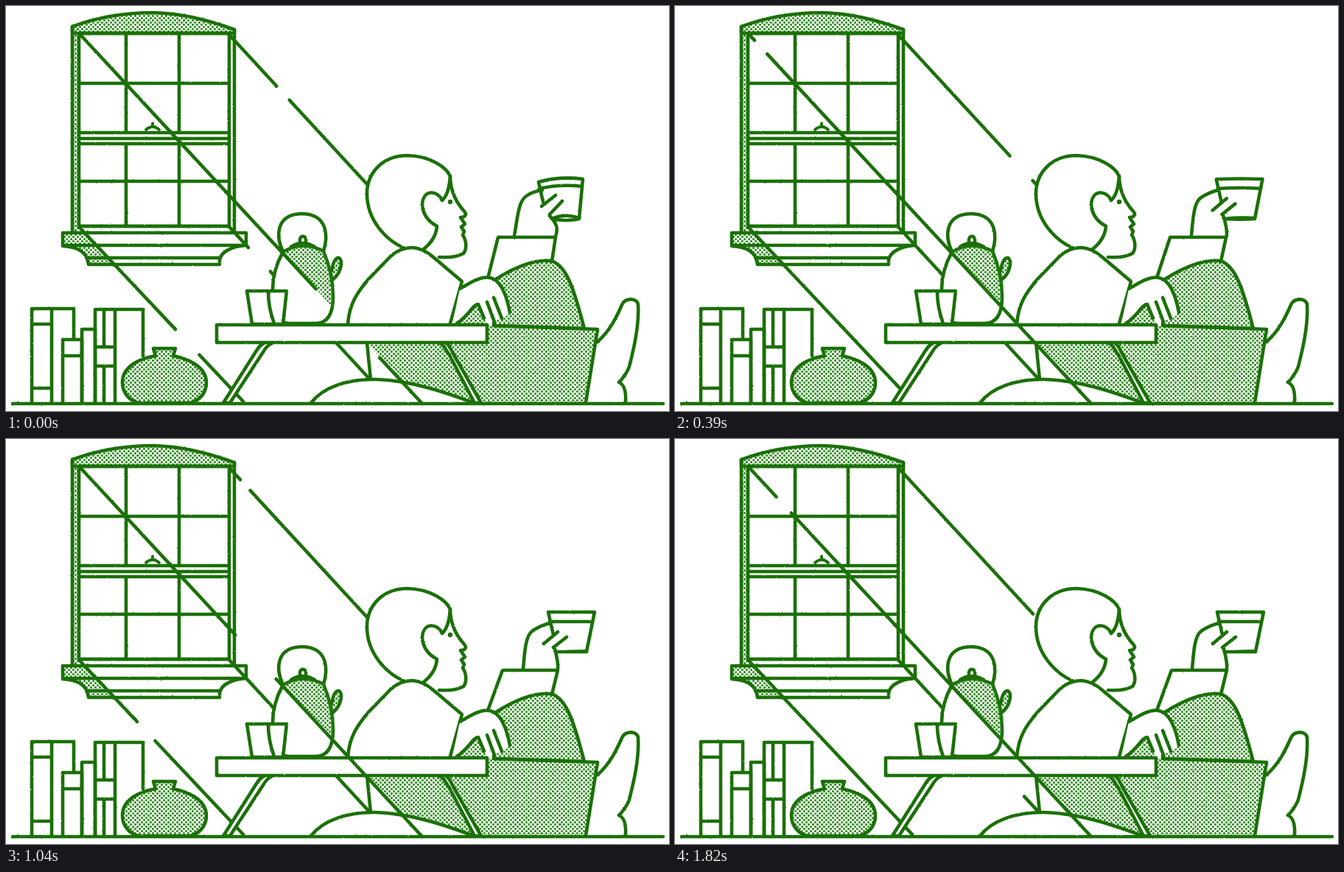
An HTML page for the animation above (1.95 s loop, 900 by 550 pixels).

```html
<!DOCTYPE html>
<html lang="en">
<head>
<meta charset="utf-8">
<title>Sunbeams</title>
<style>
  html, body { margin: 0; width: 100%; height: 100%; overflow: hidden; background: #fff; }
  svg { display: block; width: 100%; height: 100%; }
  #art { fill: none; stroke: #1b7008; stroke-width: 4.6; stroke-linecap: round; stroke-linejoin: round; }
  .paper { fill: #fff; }
  .dots { fill: url(#dots); }
  .bare { stroke: none; }
</style>
</head>
<body>
<svg viewBox="0 0 900 550" xmlns="http://www.w3.org/2000/svg">
  <defs>
    <pattern id="dots" width="6" height="6" patternUnits="userSpaceOnUse">
      <g fill="#2b8c1a"><circle cx="1.5" cy="1.5" r="1.55"/><circle cx="4.5" cy="4.5" r="1.55"/></g>
    </pattern>
    <filter id="rough" filterUnits="userSpaceOnUse" x="0" y="0" width="900" height="550" color-interpolation-filters="sRGB">
      <feTurbulence type="fractalNoise" baseFrequency=".4" numOctaves="2" seed="4"/>
      <feDisplacementMap in="SourceGraphic" scale="1.8" xChannelSelector="R" yChannelSelector="G"/>
    </filter>
    <path id="body" d="M376 334Q402 318 431 333C438 350 444 372 444 395C444 416 438 431 420 431H384C366 431 361 412 362 385C362 368 367 350 376 334Z"/>
    <clipPath id="pot"><use href="#body"/></clipPath>
  </defs>

  <g id="art" filter="url(#rough)">
    <!-- window -->
    <path class="dots" d="M90 28C130 13 165 9 200 9C240 10 278 20 310 32V37H90Z"/>
    <rect class="dots bare" x="90" y="28" width="9" height="279"/>
    <path d="M90 28V307M310 32V307"/>
    <rect x="99" y="37" width="204" height="262"/>
    <g id="panes"></g>
    <path d="M190 168Q199 160 208 168M199 164V159" stroke-width="3.8"/>
    <path class="dots bare" d="M77 308H107L147 351H112V344Q108 330 77 326Z"/>
    <path d="M77 308H326V325H77ZM77 326C98 327 110 334 112 351H290V345C292 333 308 326 326 325M112 342H290"/>

    <!-- books and vase -->
    <g id="books"></g>
    <path d="M62 411H92V451M148 412H186V475M133 412V463M133 489V539"/>
    <path class="dots" d="M200 465H230L227 475C250 480 272 490 272 512C272 526 262 536 250 539H180C168 536 158 526 158 511C158 490 180 479 203 475Z"/>

    <g id="behind"></g>

    <!-- teapot and glass -->
    <path d="M376 334C366 312 366 283 402 282C438 283 437 314 431 333"/>
    <use href="#body" class="paper"/>
    <path class="dots bare" clip-path="url(#pot)" d="M360 319L448 414V310Z"/>
    <path d="M387 327Q402 317 419 327M399 321C397 310 409 310 407 321"/>
    <path class="dots" d="M442 360Q445 341 452 342Q457 345 454 356Q451 366 443 372"/>
    <path class="paper" d="M327 387H381L376 432H334Z"/>
    <path d="M356 388C356 405 360 420 364 431"/>

    <path id="arm"/>

    <!-- sitter -->
    <path class="dots" d="M665 371C690 355 716 344 740 346C760 352 770 380 785 438L662 434Z"/>
    <path class="dots bare" d="M492 460L650 457V434L803 439L787 539H638C600 524 560 512 541 513Z"/>
    <path d="M662 434L803 439L787 539M490 457L495 507"/>
    <path class="paper" d="M414 539C430 518 462 507 500 507C550 508 600 526 635 539"/>
    <path class="paper" d="M541 329C515 318 490 290 490 255C490 225 513 203 545 203C578 204 598 220 603 231C603 252 612 268 623 280C626 285 622 287 617 287L623 296L618 300L622 306L620 311C625 318 626 330 621 336C612 341 602 342 588 341"/>
    <path d="M603 231C602 246 599 258 592 264C586 250 566 248 565 270C566 283 572 292 585 299C584 312 577 322 567 330"/>
    <circle cx="603" cy="266" r="1.7" fill="#1b7008" stroke-width="3"/>
    <path class="paper" d="M464 432C466 405 476 390 492 371L522 340Q535 328 552 328Q566 329 580 341L619 374L603 431"/>
    <path class="paper bare" d="M616 384C630 376 645 366 657 369C672 372 680 395 684 416L676 424L652 431H606Z"/>
    <path class="dots bare" d="M614 431C628 420 634 405 641 405L652 431Z"/>
    <path d="M616 384C630 376 645 366 657 369C672 372 680 395 684 416M612 431C627 422 634 405 641 405L649 424M653 402L663 429M662 396L673 424"/>
    <path d="M803 456C820 441 829 422 836 406C840 396 856 396 858 405C860 435 851 470 846 490C842 500 835 508 832 511C839 514 842 522 841 538"/>

    <!-- table -->
    <path class="paper" d="M350 458Q345 460 340 468L295 539H304L349 470Q354 461 361 458M587 457C596 461 596 466 602 474L636 539H645L607 472Q602 461 597 457"/>
    <rect class="paper" x="286" y="433" width="367" height="24"/>

    <g id="front"></g>
    <path d="M9 540H892"/>
  </g>
</svg>

<script>
const STEP = 130, STEPS = 15, CYCLE = 10, FLOOR = 539;
const byId = id => document.getElementById(id);
const lerp = (a, b, t) => a + (b - a) * t;

function addPath(parent, d = '') {
  const el = document.createElementNS('http://www.w3.org/2000/svg', 'path');
  el.setAttribute('d', d);
  byId(parent).append(el);
  return el;
}

// Two sashes of three by two panes, with a rail between them.
for (const [top, bottom, bar] of [[37, 172, 105], [187, 299, 238]]) {
  for (const x of [163, 235]) addPath('panes', `M${x} ${top}V${bottom}`);
  for (const y of [bar, bottom, top]) addPath('panes', `M99 ${y}H303`);
}
addPath('panes', 'M99 180H303');

// Spines standing on the floor: left, right, top, bands.
for (const [x0, x1, top, ...bands] of [[35, 62, 411, 432, 519], [77, 103, 453, 475], [103, 121, 439], [121, 148, 412, 463, 489]]) {
  addPath('books', `M${x0} ${FLOOR}V${top}H${x1}V${FLOOR}` + bands.map(y => `M${x0} ${y}H${x1}`).join(''));
}

// A gap is born at the top of each ray, slides down and widens:
// it starts at x = from + speed * t^power and is width + grow * t^2 wide.
const rays = [
  { layer: 'behind', line: [303, 39, 491, 243], birth: 7, from: 300, speed: 18, power: 1.2, width: 13, grow: 0.5 },
  { layer: 'behind', line: [303, 300, 494, 507], birth: 9, from: 305, speed: 24, power: 1, width: 29, grow: 0.8 },
  { layer: 'behind', line: [100, 301, 322, 537], birth: 5, from: 100, speed: 26, power: 1, width: 20, grow: 0.5 },
  { layer: 'front', line: [100, 38, 565, 540], birth: 2, from: 90, speed: 18, power: 1.4, width: 16, grow: 1.1 }
];
for (const ray of rays) ray.el = addPath(ray.layer);

function rayPath(ray, step) {
  const [x0, y0, x1, y1] = ray.line;
  const point = x => `${x} ${lerp(y0, y1, (x - x0) / (x1 - x0))}`;
  let d = '', from = x0;
  const drawTo = to => { if (to > from) d += `M${point(from)}L${point(to)}`; };
  const age = (step - ray.birth + CYCLE) % CYCLE;
  for (const t of [age, age + CYCLE]) {
    const start = ray.from + ray.speed * t ** ray.power;
    drawTo(Math.min(start, x1));
    from = Math.max(from, start + ray.width + ray.grow * t * t);
  }
  drawTo(x1);
  return d;
}

// Cup, hand and sleeve; u goes from 1 (tilted to the face) to 0 (at rest).
function armPath(u) {
  const bulge = 8 * Math.sqrt(u), cuff = 6 * Math.sqrt(u);
  const cup = `M${743 - 14 * u} 266L${736 - 13 * u} ${235 + 4 * u}Q${767 - 15 * u} ${235 - bulge / 2} ${799 - 16 * u} 235`
    + `L${788 - 10 * u} 289Q${768 - 8 * u} ${289 + bulge / 2} ${748 - 7 * u} 289`
    + `Q${768 - 9 * u} ${289 - bulge} ${788 - 10 * u} 288`
    + `M${738 - 14 * u} 248Q${767 - 15 * u} ${248 - bulge * 0.8} ${796 - 14 * u} ${248 - 3 * u}`;
  const wrist = `M${702 - 12 * u} 313C${704 - 9 * u} ${290 - 10 * u} ${705 - 8 * u} ${268 - 6 * u} ${714 - 6 * u} ${261 - 4 * u}`
    + `Q${724 - 9 * u} ${254 - 2 * u} ${738 - 10 * u} 250M${749 - 3 * u} 313C750 302 747 294 ${745 - 7 * u} 285`;
  const fingers = `M${730 - 3 * u} ${278 - 6 * u}L${749 - 3 * u} ${262 - 5 * u}M${743 - 5 * u} 283L${761 - 6 * u} ${269 - 4 * u}`;
  const sleeve = `M655 366L${674 - cuff} 314H${749 - cuff / 2}L741 347`;
  return cup + wrist + fingers + sleeve;
}

function draw(step) {
  for (const ray of rays) ray.el.setAttribute('d', rayPath(ray, step));
  byId('arm').setAttribute('d', armPath(Math.max(0, 1 - step / 4) ** 1.7));
}

let shown = -1;
const start = performance.now();
function tick() {
  const step = Math.floor((performance.now() - start) / STEP) % STEPS;
  if (step !== shown) draw(shown = step);
  requestAnimationFrame(tick);
}
tick();
</script>
</body>
</html>
```
